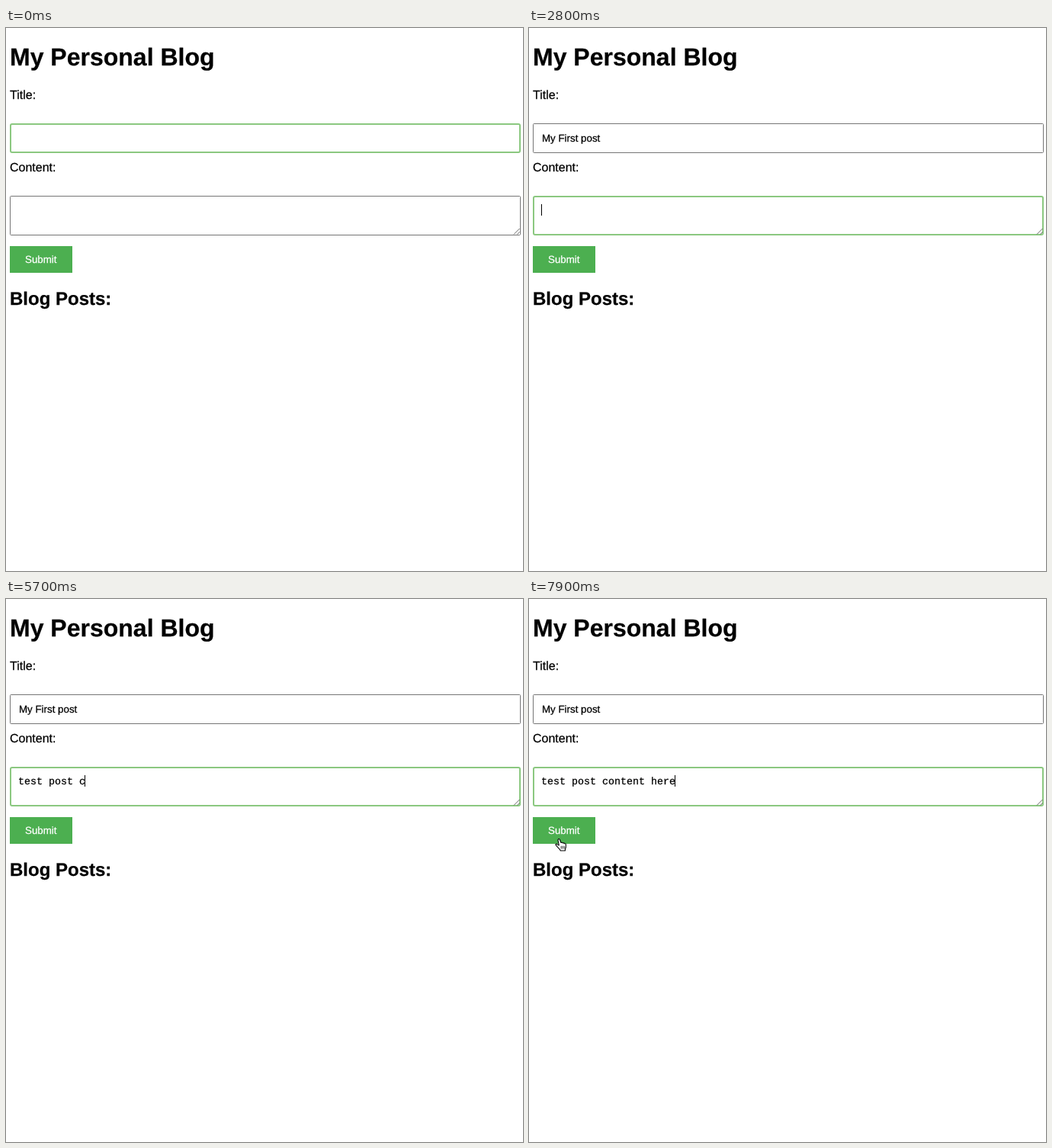
These frames come from a looping animation (678 px wide and 712 px high, 8000 ms). An HTML page:

```html
<!DOCTYPE html>
<html lang="en">
<head>
<meta charset="utf-8">
<title>My Personal Blog</title>
<style>
  html, body { margin: 0; width: 100%; height: 100%; overflow: hidden; background: #fff; }
  svg { display: block; }
  text {
    font: 13.3333px "Liberation Sans", Arial, sans-serif;
    text-rendering: geometricPrecision;
    white-space: pre;
    fill: #000;
    stroke: #000;
    stroke-width: .25;
  }
  .h1 { font-size: 32px; font-weight: bold; }
  .h2 { font-size: 24px; font-weight: bold; }
  .label { font-size: 16px; }
  .mono { font-family: "Liberation Mono", "Courier New", monospace; }
  .button { fill: #fff; stroke: #fff; }
  .box { fill: #fff; stroke: #767676; stroke-width: 1; }
  .box.focus { stroke: #8bc880; stroke-width: 2; }
  .cursor path { stroke-linejoin: round; stroke-linecap: round; }
</style>
</head>
<body>
<svg width="678" height="712" viewBox="0 0 678 712">
  <text class="h1" x="5" y="49">My Personal Blog</text>
  <text class="label" x="5" y="93">Title:</text>
  <rect class="box" id="titleBox"/>
  <text id="title" x="17" y="149"></text>
  <text class="label" x="5" y="188">Content:</text>
  <rect class="box" id="contentBox"/>
  <path d="M666 270.5 L673.5 263 M670.5 270.5 L673.5 267.5" stroke="#666" fill="none"/>
  <text class="mono" id="content" x="16" y="243"></text>
  <rect x="5" y="286" width="82" height="35" fill="#4caf50"/>
  <text class="button" x="25" y="308">Submit</text>
  <text class="h2" x="5" y="363">Blog Posts:</text>
  <rect id="caret" width="1" height="15"/>
  <g class="cursor" id="arrow">
    <path d="M0 0 V13.2 L3 10.4 L5.1 15.2 L7.3 14.2 L5.2 9.6 H9.2 Z" fill="#000" stroke="#fff" stroke-width="1.2"/>
  </g>
  <g class="cursor" id="hand">
    <path d="M-1 1 Q0 -1.5 1.2 .2 L3 4.5 Q4.8 3.8 5.4 5 Q7 4.5 7.6 5.7 Q9.4 5.5 9.4 7 Q9.7 11 8.5 13
             L8.4 15 H2.2 L1.8 13.8 L-2.1 9.6 Q-4.5 7.5 -4 6.6 Q-3 5.5 -1.1 7.3 L.3 8 Z"
      fill="#fff" stroke="#000" stroke-width="1.1"/>
    <path d="M3.2 9.2 v3 m2 -3 v3 m2 -3 v3" fill="none" stroke="#000" stroke-width=".8"/>
  </g>
</svg>
<script>
const LOOP = 8000, STEP = 100, FOCUS = 2800, BLINK = 500, KEY_GAP = 75;
const MOUSE_IN = 7100, MOVE_FROM = 7200, MOVE_TIME = 700;
const $ = id => document.getElementById(id);

// Text is typed in bursts, one letter every KEY_GAP ms from the burst's start.
const fields = {
  title: {
    top: 125, height: 39, caretTop: 137, focusAt: -700,
    bursts: { 600: "M", 800: "y F", 1125: "ir", 1325: "st", 1600: " ", 1900: "p", 2200: "os", 2500: "t" }
  },
  content: {
    top: 220, height: 52, caretTop: 231, focusAt: FOCUS,
    bursts: { 3500: "test ", 4900: "p", 5050: "ost", 5625: " conte", 6200: "nt ", 6600: "here" }
  }
};

const setAttrs = (el, attrs) => {
  for (const name in attrs) el.setAttribute(name, attrs[name]);
};
const show = (el, on) => el.setAttribute("visibility", on ? "visible" : "hidden");

function typed({ bursts, focusAt }, t) {
  let text = "", last = focusAt;
  for (const [start, letters] of Object.entries(bursts)) {
    [...letters].forEach((letter, i) => {
      const time = +start + i * KEY_GAP;
      if (time > t) return;
      text += letter;
      last = time;
    });
  }
  return { text, last };
}

function drawField(id, focused, t) {
  const field = fields[id], node = $(id), box = $(id + "Box");
  const { text, last } = typed(field, t);
  node.textContent = text;

  const line = focused ? 2 : 1;
  box.classList.toggle("focus", focused);
  setAttrs(box, {
    x: 5 + line / 2, y: field.top + line / 2,
    width: 670 - line, height: field.height - line, rx: line
  });

  if (!focused) return;
  const width = text ? node.getComputedTextLength() : 0;
  setAttrs($("caret"), { x: Math.floor(+node.getAttribute("x") + width), y: field.caretTop });
  show($("caret"), (t - last) % (2 * BLINK) < BLINK);
}

function drawMouse(t) {
  const u = Math.min(1, Math.max(0, (t - MOVE_FROM) / MOVE_TIME));
  const p = u * u * (3 - 2 * u);
  const x = 652 + (39 - 652) * p;
  const y = 313 + 2 * p + 92 * 4 * p * (1 - p);
  const visible = t >= MOUSE_IN, onButton = x < 87 && y < 321;
  for (const id of ["arrow", "hand"]) {
    $(id).setAttribute("transform", `translate(${x} ${y})`);
    show($(id), visible && onButton === (id === "hand"));
  }
}

function draw(t) {
  drawField("title", t < FOCUS, t);
  drawField("content", t >= FOCUS, t);
  drawMouse(t);
}

let start;
function tick(now) {
  start ??= now;
  draw(Math.floor((now - start) % LOOP / STEP) * STEP);
  requestAnimationFrame(tick);
}
draw(0);
requestAnimationFrame(tick);
</script>
</body>
</html>
```
